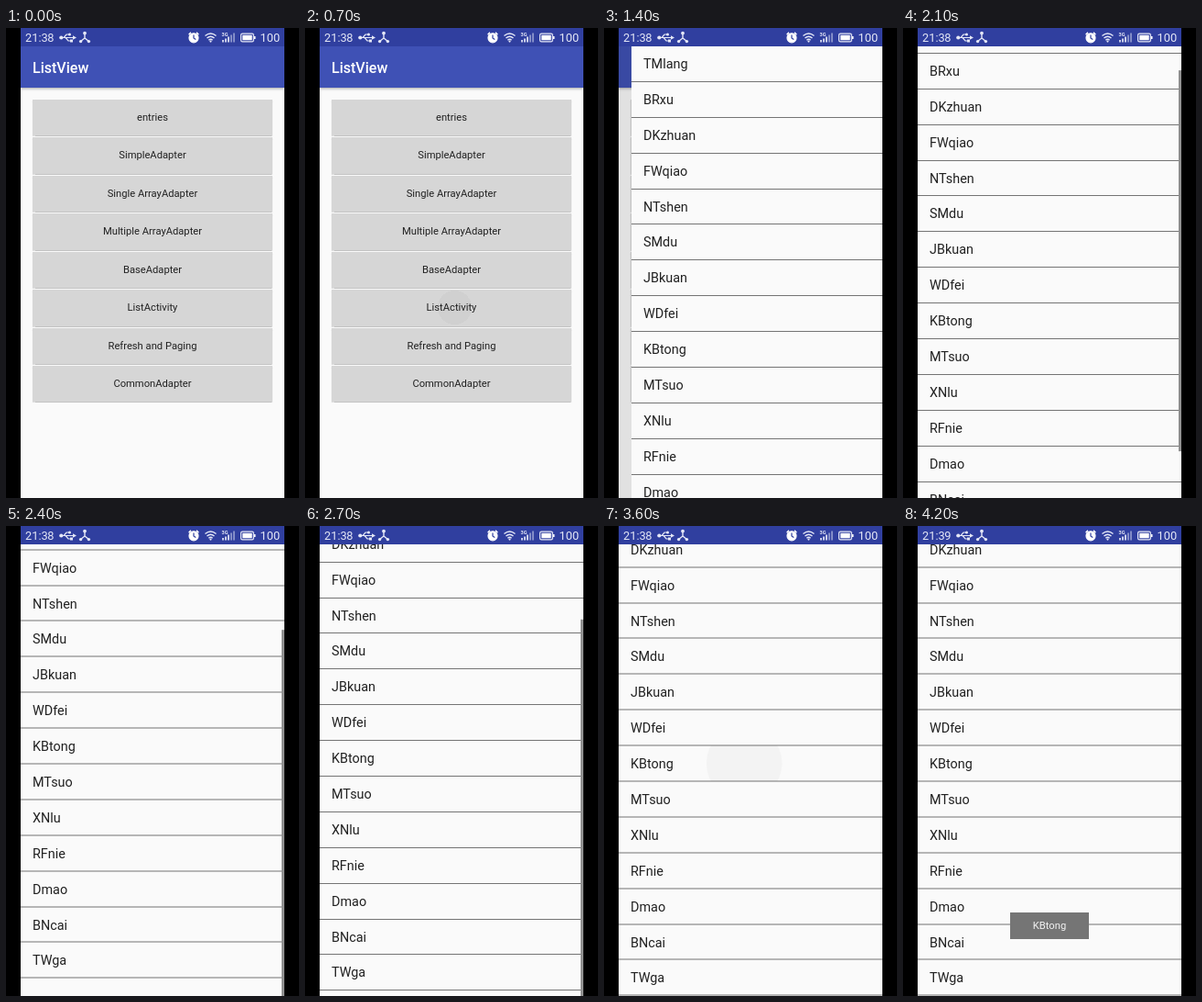
Animation of 320x512 px, one loop 4700 ms. Source, as an HTML page:

```html
<!DOCTYPE html>
<html lang="en">
<head>
<meta charset="utf-8">
<title>ListView</title>
<style>
@property --scroll { syntax: "<length>"; inherits: true; initial-value: 0px; }

* { box-sizing: border-box; }
html, body { margin: 0; width: 100%; height: 100%; overflow: hidden; background: #000; }
body { font-family: Roboto, sans-serif; color: #212121; }

/* The screen refreshes every 100 ms, so every track holds its value between keys. */
.anim { animation: 4700ms step-end infinite; }

#stage { position: absolute; left: 0; top: 0; width: 320px; height: 512px; overflow: hidden; }
#phone { position: absolute; left: 16px; top: 0; width: 288px; height: 512px; overflow: hidden; background: #fafafa; }
#phone > *, #view > * { position: absolute; }

#status { left: 0; top: 0; width: 288px; height: 20px; background: #303f9f; color: #e4e7f6; font-size: 12.8px; line-height: 21px; }
#status span { position: absolute; top: 0; }
#status svg { position: absolute; left: -16px; top: 0; }

#view { left: 0; top: 20px; width: 288px; height: 492px; overflow: hidden; }
#bar { left: 0; top: 0; width: 288px; height: 45px; padding-left: 13px; background: #3f51b5; color: #fff;
  font: 500 16px/47px Roboto, sans-serif; box-shadow: 0 1px 3px rgba(0, 0, 0, .35); }
#menu { left: 13px; top: 58px; width: 262px; }
.button { position: relative; height: 39.1px; margin-bottom: 2.4px; overflow: hidden; background: #d6d6d6;
  font-size: 11.2px; line-height: 39px; text-align: center; box-shadow: 0 .5px 1px rgba(0, 0, 0, .22); }

.ripple { position: absolute; border-radius: 50%; background: #000; opacity: 0; }
.button .ripple { left: 11px; top: -104px; width: 247px; height: 247px; animation-name: press; }
.row .ripple { left: 19px; top: -99px; width: 236px; height: 236px; animation-name: tap; }

#dim { inset: 0; background: #000; opacity: 0; animation-name: dim; }
#page { inset: 0; overflow: hidden; background: #fafafa; animation-name: slide, scroll; }
#list { transform: translateY(calc(-1 * var(--scroll))); }
.row { position: relative; height: 38.9px; padding-left: 13px; overflow: hidden; border-bottom: 1px solid #747474;
  font-size: 14.4px; line-height: 39.5px; }
#thumb { position: absolute; right: 0; top: 0; width: 3.5px; height: 415px; background: #8f8f8f;
  transform: translateY(calc(var(--scroll) * .843)); animation-name: thumb; }
#toast { left: 101px; top: 421px; width: 86px; height: 28.5px; background: #757575; color: #f2f2f2;
  font-size: 11.2px; line-height: 29px; text-align: center; animation-name: toast; }

#old { animation-name: old; }
#new { animation-name: new; }

@keyframes press {
  0% { opacity: 0; transform: scale(.1); }
  14.89% { opacity: .03; transform: scale(.15); }
  17.02% { opacity: .05; transform: scale(.3); }
  19.14% { opacity: .06; transform: scale(.48); }
  21.27% { opacity: .06; transform: scale(.66); }
  23.40% { opacity: .06; transform: scale(.84); }
  25.53% { opacity: .06; transform: none; }
  34.04%, 100% { opacity: 0; transform: none; }
}
@keyframes slide {
  0% { transform: translateX(288px); }
  27.65% { transform: translateX(96px); }
  29.78% { transform: translateX(14px); }
  31.91% { transform: translateX(2px); }
  34.04%, 100% { transform: none; }
}
@keyframes dim {
  0% { opacity: 0; }
  27.65% { opacity: .07; }
  29.78%, 100% { opacity: .1; }
}
@keyframes scroll {
  0% { --scroll: 0px; }
  44.68% { --scroll: 31px; }
  46.80% { --scroll: 68px; }
  48.93% { --scroll: 96px; }
  51.06% { --scroll: 110.5px; }
  53.19% { --scroll: 110px; }
  55.31% { --scroll: 104px; }
  57.44% { --scroll: 97px; }
  59.57% { --scroll: 93px; }
  61.70%, 100% { --scroll: 91.5px; }
}
@keyframes thumb {
  0% { opacity: 0; }
  44.68% { opacity: 1; }
  70.21% { opacity: .65; }
  72.34% { opacity: .25; }
  74.46%, 100% { opacity: 0; }
}
@keyframes tap {
  0% { opacity: 0; transform: scale(.2); }
  76.59% { opacity: .03; transform: scale(.35); }
  78.72% { opacity: .05; transform: scale(.6); }
  80.85% { opacity: .06; transform: scale(.85); }
  82.97% { opacity: .05; transform: none; }
  85.10% { opacity: .02; transform: none; }
  87.23%, 100% { opacity: 0; transform: none; }
}
@keyframes toast {
  0% { opacity: 0; }
  82.97% { opacity: .25; }
  85.10% { opacity: .55; }
  87.23% { opacity: .85; }
  89.36%, 100% { opacity: 1; }
}
@keyframes old { 0% { opacity: 1; } 82.97%, 100% { opacity: 0; } }
@keyframes new { 0% { opacity: 0; } 82.97%, 100% { opacity: 1; } }
</style>
</head>
<body>
<div id="stage">
  <div id="phone">
    <div id="view">
      <div id="menu"></div>
      <div id="bar">ListView</div>
      <div id="dim" class="anim"></div>
      <div id="page" class="anim">
        <div id="list"></div>
        <div id="thumb" class="anim"></div>
      </div>
    </div>
    <div id="toast" class="anim"></div>
    <div id="status">
      <span style="left:5px">21:3</span>
      <span id="old" class="anim" style="left:29.3px">8</span>
      <span id="new" class="anim" style="left:29.3px">9</span>
      <span style="left:261.5px">100</span>
      <svg width="320" height="20" fill="none" stroke="#e4e7f6" stroke-width="1.2">
        <!-- cable -->
        <path d="M60 10.5H74M63 10.5L66 7H69M65 10.5L68 14H71"/>
        <g fill="#e4e7f6" stroke="none">
          <circle cx="60.3" cy="10.5" r="2.1"/>
          <circle cx="69.5" cy="7" r="1.5"/>
          <path d="M70 12.5h3v3h-3zM73 8.2l4 2.3-4 2.3z"/>
        </g>
        <!-- three-way link -->
        <path d="M86 6V11L81.5 14.5M86 11L90.5 14.5" stroke-width="1.4"/>
        <g fill="#e4e7f6" stroke="none">
          <circle cx="86" cy="5.6" r="1.9"/><circle cx="81.6" cy="14.6" r="1.7"/><circle cx="90.4" cy="14.6" r="1.7"/>
        </g>
        <!-- alarm -->
        <circle cx="205" cy="10.8" r="5" fill="#fff" stroke="#fff"/>
        <path d="M199.6 7.2L202 4.9M210.4 7.2L208 4.9" stroke="#fff" stroke-width="1.5"/>
        <path d="M205 7.5V11L207.3 12.5" stroke="#303f9f"/>
        <!-- wireless -->
        <path d="M217.5 8.6Q223.5 3.2 229.5 8.6M219.5 11Q223.5 7.4 227.5 11M221.4 13.2Q223.5 11.4 225.6 13.2" stroke-width="1.4"/>
        <circle cx="223.5" cy="14.6" r="1.1" fill="#e4e7f6" stroke="none"/>
        <!-- signal -->
        <path d="M237 15.5V13M240 15.5V11.5M243 15.5V9.5" stroke-width="1.7"/>
        <path d="M246 15.5V7.5M249 15.5V5.5" stroke-width="1.7" opacity=".55"/>
        <text x="235.5" y="9" fill="#e4e7f6" stroke="none" font-size="5.5" font-weight="700" font-family="Roboto, sans-serif">3G</text>
        <!-- battery -->
        <rect x="256.6" y="6.1" width="13.8" height="8.8" rx="1.6"/>
        <path d="M258.3 7.8h10.4v5.4h-10.4zM271 9h1.5v3h-1.5z" fill="#fff" stroke="none"/>
      </svg>
    </div>
  </div>
</div>
<script>
const actions = ["entries", "SimpleAdapter", "Single ArrayAdapter", "Multiple ArrayAdapter",
  "BaseAdapter", "ListActivity", "Refresh and Paging", "CommonAdapter"];
const people = ["TMlang", "BRxu", "DKzhuan", "FWqiao", "NTshen", "SMdu", "JBkuan", "WDfei",
  "KBtong", "MTsuo", "XNlu", "RFnie", "Dmao", "BNcai", "TWga"];
const chosen = "KBtong";

function fill(id, cls, labels, active) {
  const ripple = '<i class="ripple anim"></i>';
  document.getElementById(id).innerHTML = labels
    .map(label => `<div class="${cls}">${label === active ? ripple : ""}${label}</div>`)
    .join("");
}

fill("menu", "button", actions, "ListActivity");
fill("list", "row", people, chosen);
document.getElementById("list").style.width = "288px";
document.getElementById("toast").textContent = chosen;
</script>
</body>
</html>
```
